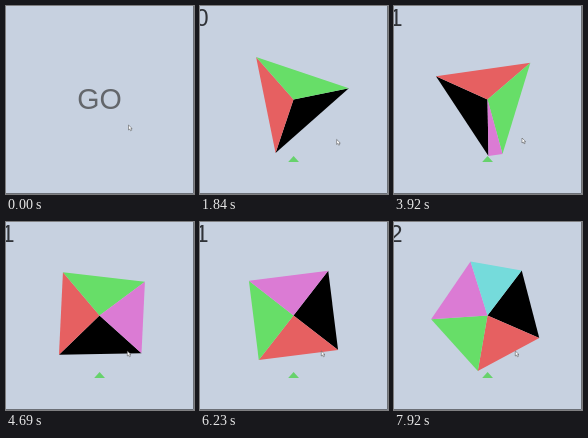
Write an HTML page that moves like this. It is 188 by 188 pixels and loops after 7990 ms.

```html
<!DOCTYPE html>
<html lang="en">
<head>
<meta charset="utf-8">
<title>Colour spinner</title>
<style>
  html, body { margin: 0; width: 100%; height: 100%; overflow: hidden; background: #c7d1e0; }
  svg { display: block; width: 100vw; height: 100vh; }
  text { font-family: "Liberation Sans", Arial, sans-serif; }
</style>
</head>
<body>
<svg viewBox="0 0 188 188">
  <rect width="188" height="188" fill="#c7d1e0"/>
  <path d="M187.5 0V187.5H0" fill="none" stroke="#6b6f76"/>
  <text id="go" x="93.5" y="102.8" font-size="28.6" text-anchor="middle" fill="#63666b">GO</text>
  <g id="game">
    <text id="score" x="-4.4" y="20" font-size="23.5" fill="#303338"></text>
    <path d="M93.6 150L99 156H88.2Z" fill="#67d26c"/>
    <g id="wheel"></g>
  </g>
  <path id="cursor" d="M0 0V5L1.2 4L2.1 5.8L3.1 5.3L2.3 3.6H3.7Z" fill="#fff" stroke="#444" stroke-width=".5"/>
</svg>
<script>
const LOOP = 7990, STEP = 76.86, LAST = 103;
const CENTER_X = 93.5, CENTER_Y = 93.4, RADIUS = 56.5;
const GROW = 1080, GAME_START = 538;
const COLORS = ['#000', '#e66061', '#67de68', '#db7bd4', '#75dbdb'];

// Each hit reverses the spin and adds a slice. Speed is in degrees per ms.
const LEVELS = [
  { start: 500, angle: -90, speed: 0.0584 },
  { start: 3747, angle: 99.6, speed: -0.0612 },
  { start: 7095, angle: -105.3, speed: 0.064 }
];

// time, x, y
const POINTER = [
  [0, 122.5, 119], [310, 108.5, 97.5], [540, 108.5, 97.5], [1150, 134, 132],
  [2610, 139.5, 135], [3000, 139.5, 135], [3840, 128, 132], [3920, 128, 132],
  [4690, 121.3, 129], [LOOP, 121.3, 129]
];

const $ = id => document.getElementById(id);
const [go, game, score, wheel, cursor] = ['go', 'game', 'score', 'wheel', 'cursor'].map($);

const slices = COLORS.map(color => {
  const slice = document.createElementNS('http://www.w3.org/2000/svg', 'path');
  slice.setAttribute('fill', color);
  return wheel.appendChild(slice);
});

function rim(degrees) {
  const a = degrees * Math.PI / 180;
  return [CENTER_X + RADIUS * Math.cos(a), CENTER_Y + RADIUS * Math.sin(a)]
    .map(v => v.toFixed(2)).join(' ');
}

function drawWheel(time) {
  let level = 0;
  while (level + 1 < LEVELS.length && time >= LEVELS[level + 1].start) level++;
  const { start, angle, speed } = LEVELS[level];
  const count = level + 3;
  const grown = level ? Math.min(1, (time - start) / GROW) : 1;
  const newest = grown * 360 / count;
  const other = (360 - newest) / (count - 1);
  let from = angle + speed * (time - start);

  slices.forEach((slice, i) => {
    const size = i < count - 1 ? other : i === count - 1 ? newest : 0;
    slice.setAttribute('d', size
      ? `M${CENTER_X} ${CENTER_Y}L${rim(from)}L${rim(from + size)}Z` : '');
    from += size;
  });
  score.textContent = level;
}

function drawPointer(time) {
  const i = POINTER.findIndex(p => p[0] > time);
  const [t0, x0, y0] = POINTER[i - 1], [t1, x1, y1] = POINTER[i];
  const k = (time - t0) / (t1 - t0);
  cursor.setAttribute('transform', `translate(${x0 + (x1 - x0) * k} ${y0 + (y1 - y0) * k})`);
}

function render(elapsed) {
  const tick = Math.min(LAST, Math.floor((elapsed % LOOP + 7) / STEP));
  const time = tick * STEP;
  const playing = time >= GAME_START - 1;
  go.style.display = playing ? 'none' : '';
  game.style.display = playing ? '' : 'none';
  if (playing) drawWheel(time);
  drawPointer(time);
}

const begin = performance.now();
function loop() {
  render(performance.now() - begin);
  requestAnimationFrame(loop);
}
loop();
</script>
</body>
</html>
```
